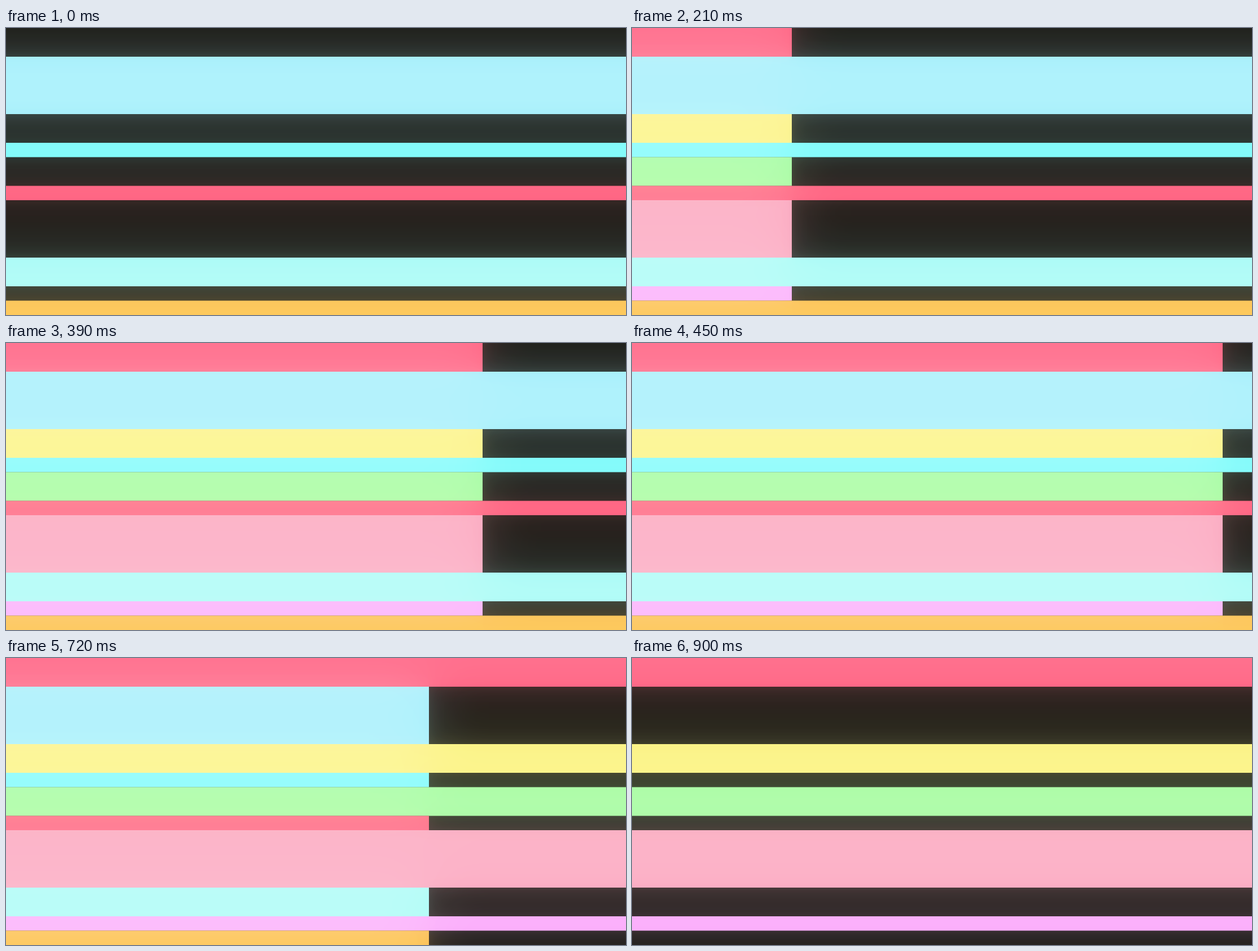
Recreate the animation shown at these times as an HTML page with a canvas. Size 1098x510 px, loop 1.12 s.

```html
<!DOCTYPE html>
<html lang="en">
<head>
<meta charset="utf-8">
<title>Glowing stripes</title>
<style>
  html, body { margin: 0; width: 100%; height: 100%; overflow: hidden; background: #1d1c17; }
  canvas { display: block; width: 100vw; height: 100vh; }
</style>
</head>
<body>
<canvas id="stage" width="1098" height="510"></canvas>
<script>
const W = 1098, H = 510, UNIT = H / 20;
const LOOP = 1120, STEP = 30;
const PAD = 140, HALF = 0.5;

// [height in units, colour, group]: group "in" wipes in, group "out" wipes away
const stripes = [
  [2, 'rgb(255,93,122)', 'in'],
  [4, 'rgb(158,237,250)', 'out'],
  [2, 'rgb(251,241,124)', 'in'],
  [1, 'rgb(120,251,251)', 'out'],
  [2, 'rgb(158,252,154)', 'in'],
  [1, 'rgb(255,93,122)', 'out'],
  [4, 'rgb(250,161,185)', 'in'],
  [2, 'rgb(162,251,245)', 'out'],
  [1, 'rgb(251,167,251)', 'in'],
  [1, 'rgb(252,185,73)', 'out']
];

// Bloom layers: blur radius and strength
const blooms = [[12, 0.115], [45, 0.235]];

const ctx = document.getElementById('stage').getContext('2d');

function layer() {
  const c = document.createElement('canvas');
  c.width = (W + 2 * PAD) * HALF;
  c.height = (H + 2 * PAD) * HALF;
  return c.getContext('2d');
}
const light = layer(), soft = layer();

// Cubic Bezier (.25, .1, .25, 1)
function ease(u) {
  if (u <= 0) return 0;
  if (u >= 1) return 1;
  const curve = (s, a, b) => 3 * (1 - s) * (1 - s) * s * a + 3 * (1 - s) * s * s * b + s * s * s;
  let lo = 0, hi = 1;
  for (let i = 0; i < 30; i++) {
    const mid = (lo + hi) / 2;
    if (curve(mid, 0.25, 0.25) < u) lo = mid; else hi = mid;
  }
  return curve(lo, 0.1, 1);
}

// Two eased moves with a pause-like knee at 30 %
function wipe(t, start, knee, end) {
  return t < knee
    ? 0.3 * ease((t - start) / (knee - start))
    : 0.3 + 0.7 * ease((t - knee) / (end - knee));
}

function widths(t) {
  const shown = t < 90 ? 0 : t >= 510 ? 1 : wipe(t, 81.4, 309.4, 515.7);
  const gone = t < 630 ? 0 : t >= 900 ? 1 : wipe(t, 595.6, 712.3, 900);
  return { in: Math.round(W * shown), out: Math.round(W * (1 - gone)) };
}

// With a margin, stripes touching the stage edge continue beyond it
function paintStripes(c, width, margin) {
  let y = 0;
  for (const [units, colour, group] of stripes) {
    const w = width[group], h = units * UNIT;
    if (w > 0) {
      const right = w >= W ? W + margin : w;
      const top = y === 0 ? -margin : y;
      const bottom = y + h >= H ? H + margin : y + h;
      c.fillStyle = colour;
      c.fillRect(-margin, top, right + margin, bottom - top);
    }
    y += h;
  }
}

function clear(c) {
  c.setTransform(1, 0, 0, 1, 0, 0);
  c.clearRect(0, 0, c.canvas.width, c.canvas.height);
}

function draw(t) {
  const width = widths(t);
  ctx.fillStyle = 'rgb(29,28,23)';
  ctx.fillRect(0, 0, W, H);
  paintStripes(ctx, width, 0);

  clear(light);
  light.setTransform(HALF, 0, 0, HALF, PAD * HALF, PAD * HALF);
  paintStripes(light, width, PAD);

  ctx.globalCompositeOperation = 'screen';
  for (const [radius, strength] of blooms) {
    clear(soft);
    soft.filter = `blur(${radius * HALF}px)`;
    soft.drawImage(light.canvas, 0, 0);
    soft.filter = 'none';
    ctx.globalAlpha = strength;
    ctx.drawImage(soft.canvas, -PAD, -PAD, W + 2 * PAD, H + 2 * PAD);
  }
  ctx.globalAlpha = 1;
  ctx.globalCompositeOperation = 'source-over';
}

let last = -1;
const begin = performance.now();
function tick() {
  const t = (performance.now() - begin) % LOOP;
  const stepped = Math.floor(t / STEP) * STEP;
  if (stepped !== last) draw(last = stepped);
  requestAnimationFrame(tick);
}
tick();
</script>
</body>
</html>
```
